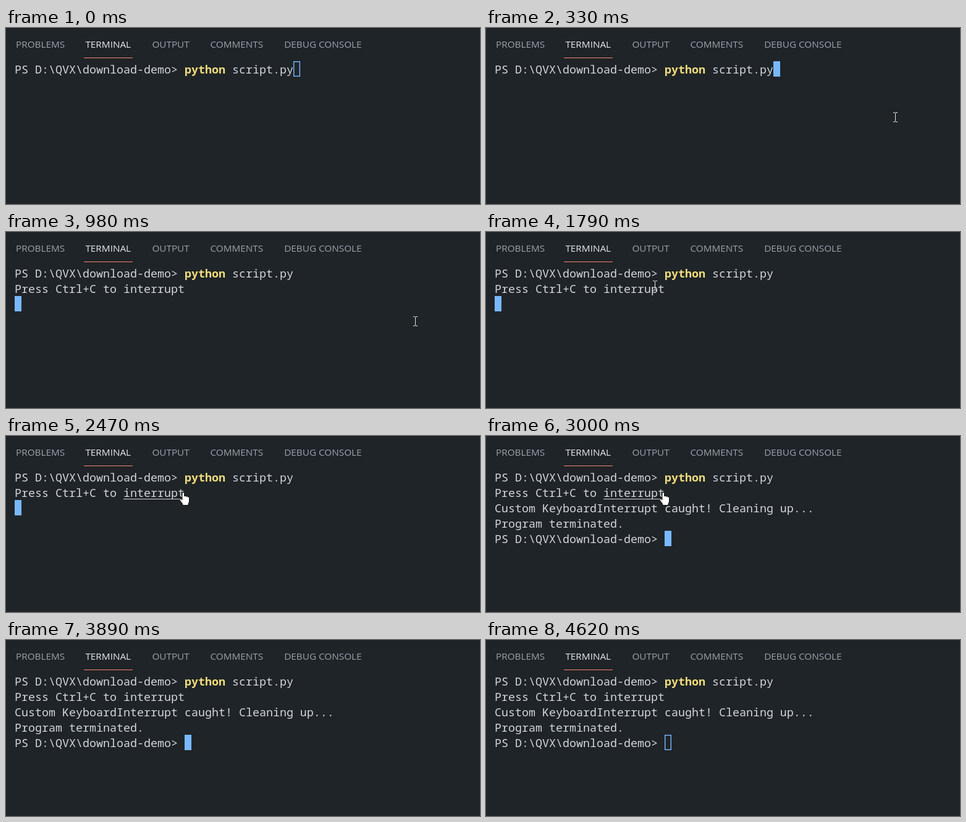
An HTML page that plays this animation: 767x286 px, repeating every 4.71 s.

```html
<!DOCTYPE html>
<html lang="en">
<head>
<meta charset="utf-8">
<title>Terminal</title>
<style>
html, body { margin: 0; width: 100%; height: 100%; overflow: hidden; background: #1f2428; }
svg { display: block; }
text { white-space: pre; }
#tabs { font: 15.3px "Open Sans", "Noto Sans", sans-serif; fill: #9aa2aa; }
#tabs .active { fill: #e6e9ec; }
#lines { font: 500 18.333px "Noto Sans Mono", "DejaVu Sans Mono", monospace; fill: #d3d6d9; }
#lines .command { fill: #f2dc7c; font-weight: 600; }
</style>
</head>
<body>
<svg width="767" height="286" viewBox="0 0 767 286">
  <rect width="767" height="1" fill="#1b1f23"/>
  <g id="tabs">
    <text x="16" y="32">PROBLEMS</text>
    <text x="128.4" y="32" class="active">TERMINAL</text>
    <text x="236.4" y="32">OUTPUT</text>
    <text x="330.4" y="32">COMMENTS</text>
    <text x="450.2" y="32">DEBUG CONSOLE</text>
  </g>
  <rect x="126" y="48" width="79" height="1" fill="#f9826c"/>
  <g id="lines">
    <text>PS D:\QVX\download-demo&gt; <tspan class="command">python</tspan> script.py</text>
    <text>Press Ctrl+C to interrupt</text>
    <text>Custom KeyboardInterrupt caught! Cleaning up...</text>
    <text>Program terminated.</text>
    <text>PS D:\QVX\download-demo&gt;</text>
  </g>
  <rect id="link" x="190" y="102" width="98" height="1" fill="#d3d6d9"/>
  <rect id="caret" x=".7" y=".7" width="9.6" height="23.6" stroke="#79b8ff" stroke-width="1.4"/>
  <path id="beam" d="M-3 -7.5H0M1 -7.5H4M-3 7.5H0M1 7.5H4M.5 -7V7" fill="none" stroke="#e6e6e6"/>
  <path id="hand" fill="#fff" stroke="#111" d="M-2 12V2.2a1.8 1.8 0 0 1 3.6 0V7
    a1.5 1.5 0 0 1 2.8 .5a1.5 1.5 0 0 1 2.8 .8a1.4 1.4 0 0 1 2.3 1.2V15
    q0 2.2-1.5 4V21.5H-1.2V19.5L-5.8 13.2q-.8-1.7 .6-2.2q1.2-.3 3.2 2.2z"/>
</svg>
<script>
const LOOP = 4710, CELL = 11, ROW = 25, LEFT = 14, TOP = 54;
const $ = id => document.getElementById(id);
const lines = [...$('lines').children];

// Each stroke is a curve that begins where the one before ended
const origin = [780, 315];
const strokes = [
  { first: 70, last: 330, steps: 5, bend: [672, 145], end: [662, 145] },
  { first: 1580, last: 2000, steps: 7, bend: [110, 63], end: [299, 91] },
  { first: 2130, last: 2200, steps: 2, bend: [293, 91], end: [288, 91] },
  { first: 3400, last: 3890, steps: 8, bend: [713, 393], end: [790, 200] }
];

const show = (el, on) => el.setAttribute('visibility', on ? 'visible' : 'hidden');
const move = (el, x, y) => el.setAttribute('transform', `translate(${x} ${y})`);
const curve = (a, b, c, u) => (1 - u) ** 2 * a + 2 * u * (1 - u) * b + u * u * c;

function pointerAt(t) {
  let from = origin;
  for (const { first, last, steps, bend, end } of strokes) {
    if (t < first) break;
    const step = Math.floor((t - first) * (steps - 1) / (last - first)) + 1;
    const u = Math.min(1, step / steps);
    from = from.map((start, i) => Math.round(curve(start, bend[i], end[i], u)));
  }
  return from;
}

function caretAt(t) {
  const width = line => line.textContent.length;
  if (t < 930) return [width(lines[0]), 0];
  if (t < 3000) return [0, t < 980 ? 1 : 2];
  return [width(lines[4]) + 1, 4];
}

function draw() {
  const t = performance.now() % LOOP;
  const count = t < 980 ? 1 : t < 3000 ? 2 : lines.length;
  lines.forEach((line, i) => show(line, i < count));

  const [col, row] = caretAt(t);
  const focused = t >= 70 && t < 4620;
  move($('caret'), LEFT + col * CELL, TOP + row * ROW);
  $('caret').setAttribute('fill', focused ? '#79b8ff' : 'none');

  const [x, y] = pointerAt(t);
  const hovering = t >= 2400 && t < 3200;
  show($('beam'), !hovering);
  show($('hand'), hovering);
  show($('link'), t >= 2470 && t < 3200);
  move($('beam'), x, y);
  move($('hand'), x - 1, y);
  requestAnimationFrame(draw);
}

lines.forEach((line, i) => {
  line.setAttribute('x', LEFT);
  line.setAttribute('y', TOP + 20 + i * ROW);
});
draw();
</script>
</body>
</html>
```
